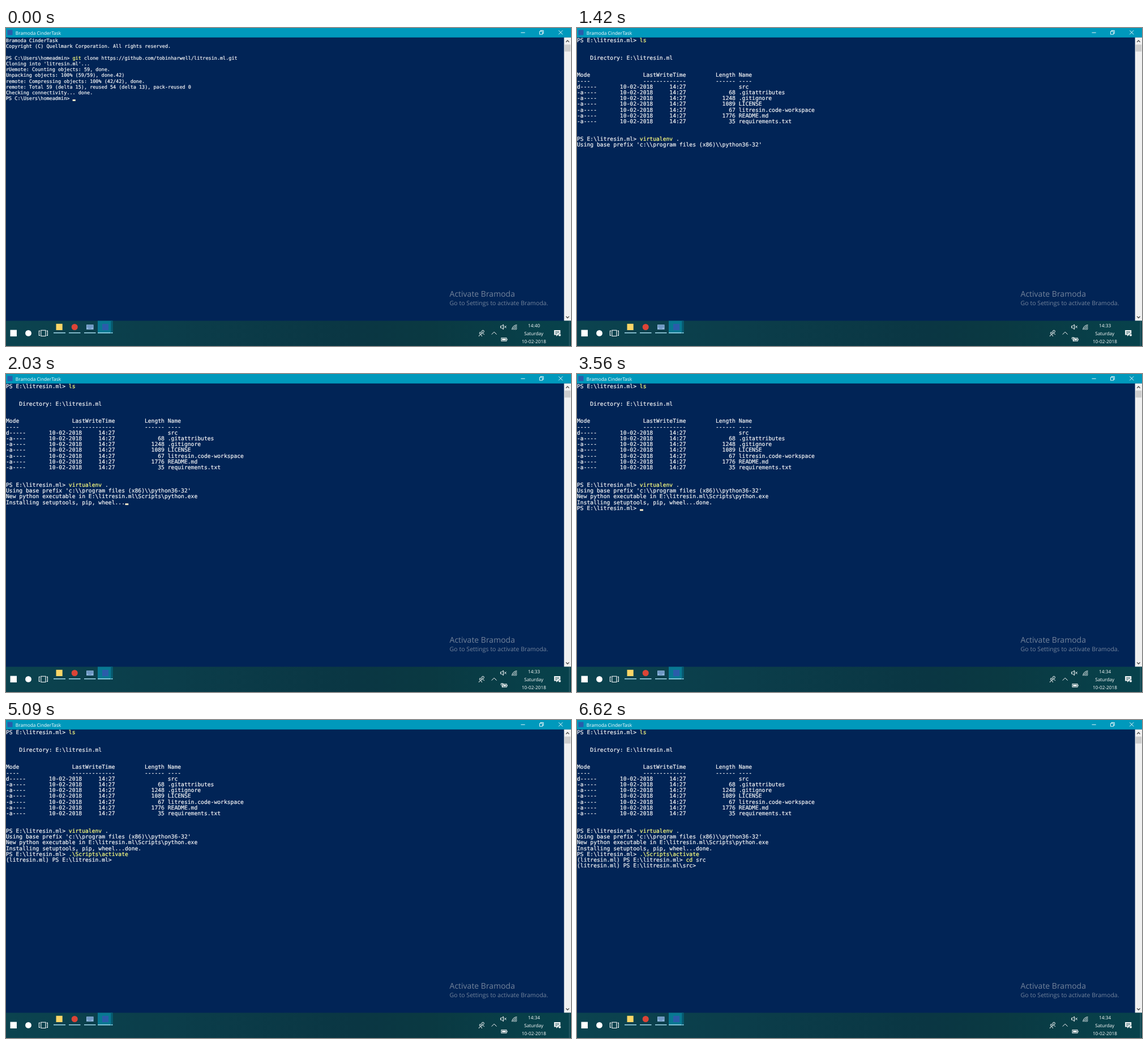
An HTML page for the animation above (8000 ms loop, 998 px wide and 561 px high).

```html
<!DOCTYPE html>
<html lang="en">
<head>
<meta charset="utf-8">
<title>Terminal session</title>
<style>
  html, body { margin: 0; width: 100%; height: 100%; overflow: hidden; background: #012456; }
  svg { display: block; width: 998px; height: 561px; }
  text { white-space: pre; text-rendering: geometricPrecision; }
  .ui { font-family: "Open Sans", "Noto Sans", sans-serif; fill: #fff; }
  #screen { font-family: "DejaVu Sans Mono", "Liberation Mono", monospace; fill: #f4f3f5; stroke: #f4f3f5; stroke-width: .22; }
  #screen .command { fill: #ffff80; stroke: #ffff80; }
  .line { fill: none; stroke: #fff; }
</style>
</head>
<body>
<svg viewBox="0 0 998 561" xmlns="http://www.w3.org/2000/svg">
  <defs>
    <linearGradient id="bar">
      <stop offset="0" stop-color="#0b434f"/>
      <stop offset=".3" stop-color="#0b3d4a"/>
      <stop offset=".62" stop-color="#0a3643"/>
      <stop offset=".75" stop-color="#0a3942"/>
      <stop offset="1" stop-color="#07424c"/>
    </linearGradient>
  </defs>
  <rect width="998" height="561" fill="#012456"/>

  <g id="screen"></g>
  <rect id="cursor" height="2.9" fill="#fdeecb"/>

  <g class="ui" style="fill:#73839b">
    <text x="783.6" y="474.2" font-size="14">Activate Bramoda</text>
    <text x="783.6" y="489.4" font-size="10.6">Go to Settings to activate Bramoda.</text>
  </g>

  <!-- title bar -->
  <rect width="998" height="16.7" fill="#0099bc"/>
  <rect x="2.5" y="3.5" width="9" height="9" fill="#2a5caa"/>
  <text class="ui" x="16.8" y="11.5" font-size="8.3">Bramoda CinderTask</text>
  <path class="line" stroke-width=".9" d="M909.5 8.2h7.2M942.5 6h5.2v5.2h-5.2zM944 6V4.4h5.3v5.3h-1.6M976.2 4.3l7 7m0-7l-7 7"/>

  <!-- scroll bar -->
  <rect x="985.7" y="16.7" width="12.3" height="500" fill="#f0f0f0"/>
  <rect x="986.6" y="29.3" width="10.6" height="12.2" fill="#cdcdcd"/>
  <path d="M989.2 24.8l2.7-2.7 2.7 2.7M989.2 508.8l2.7 2.7 2.7-2.7" fill="none" stroke="#505050" stroke-width="1.4"/>

  <!-- taskbar -->
  <rect y="516.5" width="998" height="44.5" fill="url(#bar)"/>
  <rect x="7.5" y="532.6" width="11.5" height="11.5" fill="#fff"/>
  <circle cx="39.5" cy="538.4" r="5.4" fill="#fff"/>
  <path class="line" stroke-width="1.1" d="M61.8 533.2h8.2v10.3h-8.2zM60 534.4h-1.6v8H60M71.8 534.4h1.6v8h-1.6"/>
  <rect x="162" y="516.5" width="26.4" height="22" fill="#087892"/>
  <rect x="185.2" y="516.5" width="3.2" height="22" fill="#075a70"/>
  <g fill="#a5dcee">
    <rect x="84" y="537" width="21" height="1.5"/>
    <rect x="111" y="537" width="20.5" height="1.5"/>
    <rect x="138" y="537" width="20.5" height="1.5"/>
    <rect x="162" y="537" width="23.2" height="1.5"/>
    <rect x="186" y="537" width="2.4" height="1.5"/>
  </g>
  <rect x="88.5" y="521.8" width="11.2" height="11.2" fill="#f9d567"/>
  <circle cx="121.2" cy="527.5" r="5.5" fill="#db4437"/>
  <rect x="142" y="523.3" width="12.6" height="8.6" fill="#8db4dc"/>
  <path d="M143.2 525.3h10.2M143.2 527.5h10.2M145.5 529.8h5.6" fill="none" stroke="#315f92" stroke-width="1" stroke-dasharray="1.3 .5"/>
  <rect x="170" y="522" width="11" height="11" fill="#2a5caa"/>

  <!-- tray -->
  <g class="line" stroke-width="1">
    <circle cx="842.4" cy="535.3" r="2"/>
    <circle cx="838" cy="538.3" r="1.7"/>
    <path d="M839.8 540.3q2.6-3.5 5 .8M835.2 544q2.8-6.4 5.6 0M857.8 540.6l4.4-4.4 4.4 4.4"/>
    <path d="M873.5 525.8h2l3-2.6v8.4l-3-2.6h-2zM880.2 525.5l3.6 3.6m0-3.6l-3.6 3.6"/>
    <path d="M893.7 532.2a9 9 0 0 1 8.8-8.4M895.8 532.3a6.8 6.8 0 0 1 6.7-6.3M898 532.4a4.6 4.6 0 0 1 4.5-4.1M900.3 532.5a2.3 2.3 0 0 1 2.2-2"/>
  </g>
  <g id="battery">
    <rect class="line" x="875" y="546.8" width="9" height="5.4"/>
    <rect x="876.3" y="548.1" width="6.4" height="2.8" fill="#fff"/>
    <rect x="884.5" y="548.4" width="1.2" height="2.2" fill="#fff"/>
  </g>
  <g id="charging">
    <rect class="line" x="877.3" y="547" width="7" height="5.2"/>
    <rect x="878.6" y="548.3" width="4.4" height="2.6" fill="#fff"/>
    <rect x="884.8" y="548.5" width="1" height="2.2" fill="#fff"/>
    <path class="line" stroke-width=".9" d="M875 545v1.8m2.4-1.8v1.8m-3.2 0h4v1.8q-2 2-4 0zM876.2 550v2.4h1.2"/>
  </g>
  <g class="ui" font-size="8.25" text-anchor="middle">
    <text id="clock" x="932.6" y="527.9"></text>
    <text x="932.2" y="541.9">Saturday</text>
    <text x="932.4" y="555.7">10-02-2018</text>
  </g>
  <path d="M968.2 533h11v8.4h-4.4l-2.6 2.6v-2.6h-4z" fill="#fff"/>
  <path d="M970 535.4h7.4M970 537.4h7.4M970 539.4h4" stroke="#07424c" stroke-width=".8"/>
  <circle cx="978" cy="541.8" r="2.3" fill="#fff" stroke="#07424c" stroke-width=".7"/>
  <path d="M995.2 516.5v44.5" stroke="#4b7780" stroke-width=".8"/>
</svg>

<script>
const LOOP = 8000, ROW = 10.23, FIRST_BASELINE = 24.9;
const WIDE = 5.845, NARROW = 5.114, ADVANCE = 0.602;
const $ = id => document.getElementById(id);

// Commands stand in braces.
const cloneLines = String.raw`Bramoda CinderTask
Copyright (C) Quellmark Corporation. All rights reserved.

PS C:\Users\homeadmin> {git} clone https://github.com/tobinharwell/litresin.ml.git
Cloning into 'litresin.ml'...
rUemote: Counting objects: 59, done.
Unpacking objects: 100% (59/59), done.42)
remote: Compressing objects: 100% (42/42), done.
remote: Total 59 (delta 15), reused 54 (delta 13), pack-reused 0
Checking connectivity... done.
PS C:\Users\homeadmin> `.split("\n");

const prompt = String.raw`PS E:\litresin.ml> `;
const venvPrompt = "(litresin.ml) " + prompt;

const entry = (mode, size, name) =>
  mode.padEnd(13) + "10-02-2018     14:27" + String(size).padStart(15) + " " + name;

const listing = [
  prompt + "{ls}", "", "",
  String.raw`    Directory: E:\litresin.ml`, "", "",
  "Mode".padEnd(20) + "LastWriteTime".padEnd(22) + "Length Name",
  "----".padEnd(20) + "-------------".padEnd(22) + "------ ----",
  entry("d-----", "", "src"),
  entry("-a----", 68, ".gitattributes"),
  entry("-a----", 1248, ".gitignore"),
  entry("-a----", 1089, "LICENSE"),
  entry("-a----", 67, "litresin.code-workspace"),
  entry("-a----", 1776, "README.md"),
  entry("-a----", 35, "requirements.txt"), "", "",
  prompt + "{virtualenv} .",
  String.raw`Using base prefix 'c:\\program files (x86)\\python36-32'`
];
const created = [...listing, String.raw`New python executable in E:\litresin.ml\Scripts\python.exe`];
const installing = [...created, "Installing setuptools, pip, wheel..."];
const installed = [...created, "Installing setuptools, pip, wheel...done."];
const activated = [...installed, prompt + String.raw`{.\Scripts\activate}`];

const scenes = [
  { at: 0, lines: cloneLines, pitch: NARROW, cursor: true, clock: "14:40" },
  { at: 500, lines: listing, clock: "14:33", charging: true },
  { at: 2030, lines: installing, cursor: true, clock: "14:33", charging: true },
  { at: 3560, lines: [...installed, prompt], cursor: true, clock: "14:34" },
  { at: 5090, lines: [...activated, venvPrompt], clock: "14:34" },
  { at: 6620, lines: [...activated, venvPrompt + "{cd} src",
      String.raw`(litresin.ml) PS E:\litresin.ml\src> `], clock: "14:34" }
];

const lineMarkup = (line, row) => {
  const content = line.replace(/>/g, "&gt;")
    .replace(/\{(.*?)\}/, '<tspan class="command">$1</tspan>');
  return `<text x="0" y="${FIRST_BASELINE + row * ROW}">${content}</text>`;
};

function show({ lines, pitch = WIDE, cursor, clock, charging }) {
  const screen = $("screen"), last = lines.length - 1;
  screen.setAttribute("font-size", pitch / ADVANCE);
  screen.innerHTML = lines.map(lineMarkup).join("");
  $("cursor").setAttribute("x", lines[last].length * pitch);
  $("cursor").setAttribute("y", FIRST_BASELINE + last * ROW - 1.2);
  $("cursor").setAttribute("width", pitch);
  $("cursor").style.display = cursor ? "" : "none";
  $("clock").textContent = clock;
  $("battery").style.display = charging ? "none" : "";
  $("charging").style.display = charging ? "" : "none";
}

const start = performance.now();
let shown;

function tick() {
  const time = (performance.now() - start) % LOOP;
  const scene = scenes.findLast(s => s.at <= time);
  if (scene !== shown) show(shown = scene);
  requestAnimationFrame(tick);
}
tick();
</script>
</body>
</html>
```
